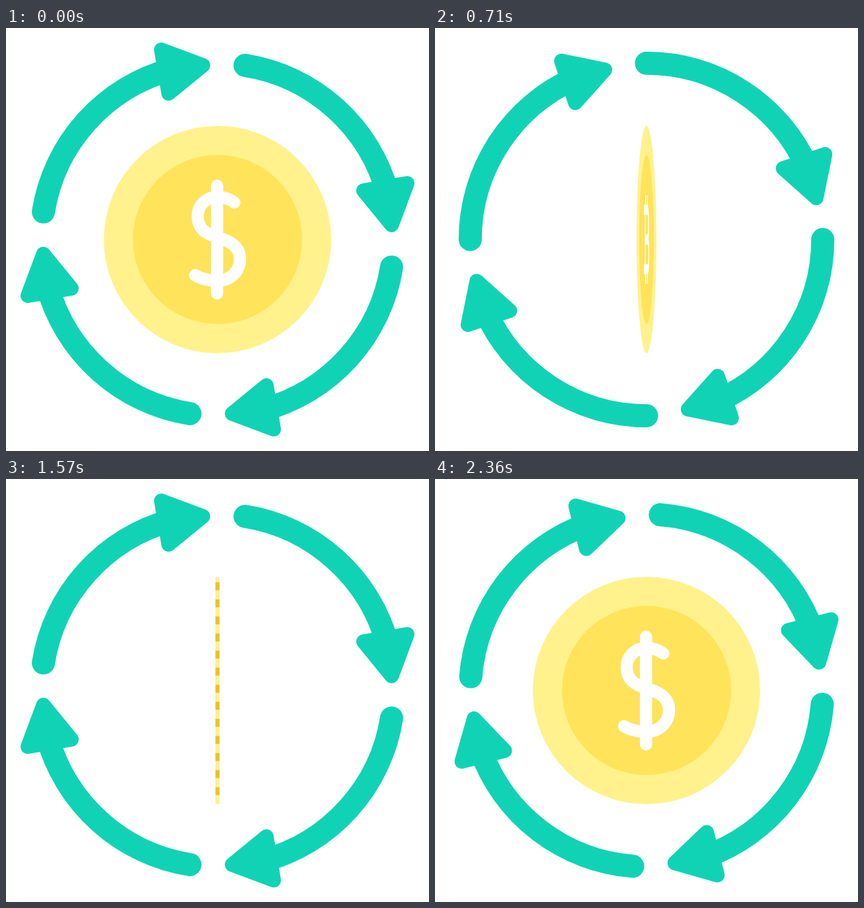
Animation, 640 px wide and 640 px high, one loop 2.43 s. Source, as an HTML page with a canvas:

```html
<!DOCTYPE html>
<html lang="en">
<head>
<meta charset="utf-8">
<title>Currency exchange</title>
<style>
  html, body { margin: 0; width: 100%; height: 100%; overflow: hidden; background: #fff; }
  canvas { display: block; width: 100vw; height: 100vh; }
</style>
</head>
<body>
<canvas id="stage" width="640" height="640"></canvas>
<script>
const ctx = document.getElementById('stage').getContext('2d');
const LOOP = 2430;
const STEP = 1000 / 14;
const TEAL = '#10d3b6', PALE = '#fff28c', GOLD = '#ffe35b', DARK = '#e5c433';
const RING = 266.7;
const RAD = Math.PI / 180;

const dollar = new Path2D(
  'M-.7-81.5V81.5M25.5-56C17-62 9-64.5 0-64.5C-17-64.5-30-52-30-35' +
  'C-30-15-16-8.5 0-3C18 2 34 10 34 29C34 49 19 62.5 0 62.5C-13 62.5-25 59.5-34 54');
const bitcoin = new Path2D(
  'M-45-45H14.7A22.5 22.5 0 0 1 14.7 0H-22.5M-22.5-45V45' +
  'M-45 45H19A22.5 22.5 0 0 0 19 0H0' +
  'M-14.7-67V-45M14.7-67V-45M-14.7 45V67M14.7 45V67');
const head = new Path2D('M221-74L287-85L263.5-22Z');

// Eased progress of an 11-tick move that begins at `start`
function ease(tick, start) {
  const u = Math.min(1, Math.max(0, (tick - start) / 11));
  return u * u * (3 - 2 * u);
}

function coinWidth(tick) {
  if (tick < 14) return 1 - ease(tick, 0);
  if (tick < 27) return ease(tick, 16);
  if (tick < 41) return 1 - ease(tick, 27);
  return ease(tick, 44.7);
}

function drawArrows(angle) {
  ctx.strokeStyle = ctx.fillStyle = TEAL;
  ctx.lineCap = ctx.lineJoin = 'round';
  for (let q = 0; q < 4; q++) {
    ctx.save();
    ctx.rotate((angle + q * 90) * RAD);
    ctx.lineWidth = 35;
    ctx.beginPath();
    ctx.arc(0, 0, RING, -81 * RAD, -15 * RAD);
    ctx.stroke();
    ctx.lineWidth = 22;
    ctx.fill(head);
    ctx.stroke(head);
    ctx.restore();
  }
}

function disc(r, color) {
  ctx.fillStyle = color;
  ctx.beginPath();
  ctx.arc(0, 0, r, 0, 2 * Math.PI);
  ctx.fill();
}

function drawFace(scale, isDollar) {
  ctx.save();
  ctx.scale(scale, 1);
  disc(172, PALE);
  disc(128, GOLD);
  ctx.strokeStyle = '#fff';
  ctx.lineCap = isDollar ? 'round' : 'butt';
  ctx.lineJoin = isDollar ? 'round' : 'miter';
  ctx.lineWidth = isDollar ? 18.5 : 15;
  ctx.stroke(isDollar ? dollar : bitcoin);
  ctx.restore();
}

function drawEdge(w) {
  ctx.fillStyle = PALE;
  ctx.beginPath();
  ctx.roundRect(-w / 2, -172, w, 344, w / 2);
  ctx.fill();
  ctx.fillStyle = DARK;
  for (let i = 0; i < 13; i++) ctx.fillRect(-w / 2, -163.7 + i * 25.83, w, 12);
}

function draw(ms) {
  // 25 ticks per second, shown 14 times per second
  const step = Math.floor((Math.floor(ms / 10) * 10 + 5) / STEP);
  const tick = Math.floor((step + 0.5) * 25 / 14);
  ctx.setTransform(1, 0, 0, 1, 0, 0);
  ctx.fillStyle = '#fff';
  ctx.fillRect(0, 0, 640, 640);
  ctx.translate(320, 320);
  drawArrows(tick * 4.5);
  const scale = coinWidth(tick);
  if (scale > 0.02) drawFace(scale, tick < 14 || tick > 41);
  else drawEdge(tick < 30 ? 7 : 6.3);
}

let start;
function loop(now) {
  start ??= now;
  draw(Math.max(0, now - start) % LOOP);
  requestAnimationFrame(loop);
}
draw(0);
requestAnimationFrame(loop);
</script>
</body>
</html>
```
